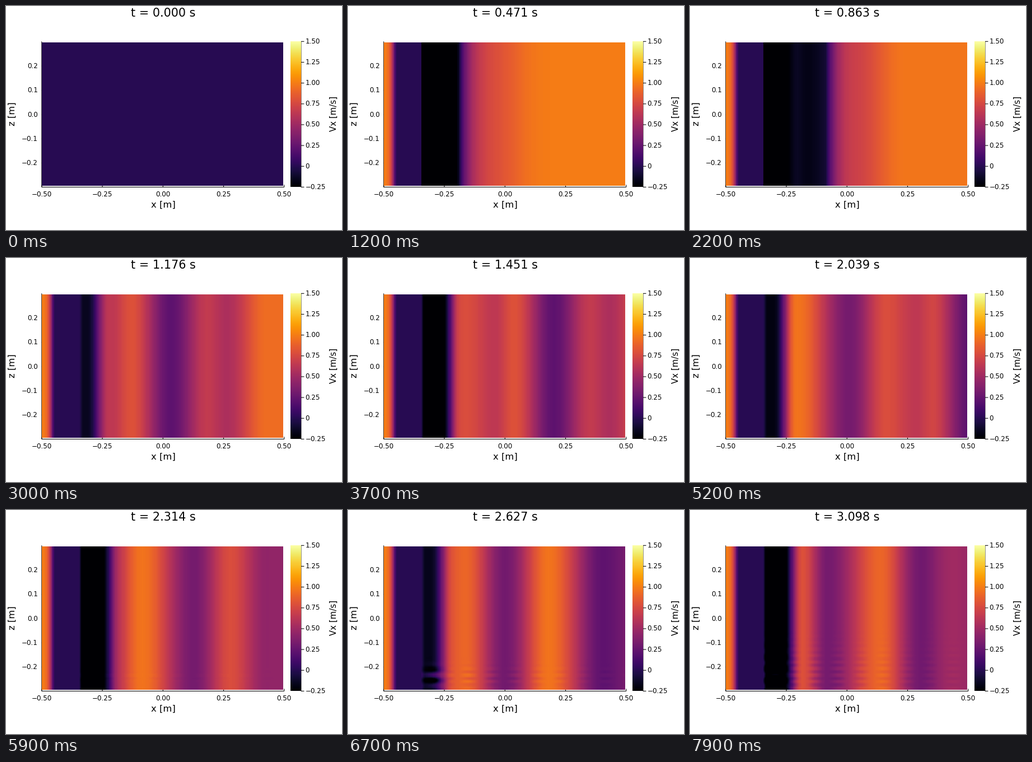
These frames come from a looping animation (600 by 400 pixels, 8 s). A matplotlib script:

```python
import numpy as np
import matplotlib.pyplot as plt
from matplotlib.animation import FuncAnimation

plt.rcParams["font.family"] = "DejaVu Sans"
DPI, W, H = 100, 600, 400
FRAMES, DT = 80, 2 / 51
VMIN, VMAX = -0.25, 1.5
NX, NZ = 200, 120
FRONT, BACK = -0.45, -0.347  # faces of the solid body

x = -0.5 + (np.arange(NX) + 0.5) / NX
z = (0.297 - 0.594 * (np.arange(NZ) + 0.5) / NZ)[:, None]

# crests and troughs of the shed wake, in coordinates that drift with it
CREST_X = [-1.37, -1.265, -1.045, -.88, -.7, -.487, -.333, -.21, -.13,
           .035, .185, .265, .43]
CREST_U = [.8, .32, .9, .31, .96, .32, .78, .64, .8, .22, .66, .56, .93]


def smooth(s):
    s = np.clip(s, 0, 1)
    return s * s * (3 - 2 * s)


def mix(a, b, s):
    return a + (b - a) * s


def bump(s):
    return np.exp(-s * s)


def drift(t):
    """Distance the wake has travelled, with one short slowdown."""
    return 0.617 * (t - 1.176) - 0.087 * bump((t - 2.28) / 0.25)


def wave(q):
    i = np.interp(q, CREST_X, np.arange(len(CREST_X)))
    k = np.minimum(i.astype(int), len(CREST_X) - 2)
    u = np.array(CREST_U)
    return mix(u[k], u[k + 1], smooth(i - k))


def growing_bubble(t):
    """Recirculation behind the body whose end moves off steadily."""
    d = np.maximum(x + 0.35 - 0.306 * t, 0)
    tail = 1 - 0.2 / (1 + np.exp((x - 0.05) / 0.04))
    return mix(-0.5, tail, 1 - np.exp(-d / 0.047))


def shed_wake(t):
    """Short pulsing bubble followed by the drifting wave."""
    pulse = np.cos(2 * np.pi * (t - 2.314) / 0.8)
    core = (-0.29 - 0.16 * pulse) * smooth((x - BACK) / 0.02)
    edge = -0.292 + 0.02 * pulse
    u = mix(core, wave(x - drift(t)), smooth((x - edge) / 0.09))
    drag = 0.5 * smooth((x - 0.28) / 0.22) * smooth(t - 1.5)
    return u * (1 - drag)


def streaks(t):
    """Layers near the floor that strengthen and climb."""
    s = max((t - 2.2) / 0.9, 0)
    reach = min(2.2 * s, 1) * bump((z + 0.245) / (0.02 + 0.09 * s * s))
    near = -0.25 * np.cos(2 * np.pi * (z + 0.21) / 0.049)
    far = 0.08 * np.cos(2 * np.pi * (z + 0.263) / 0.027)
    columns = np.cos(np.pi * (x - drift(t) + 1.03) / 0.095) ** 2
    columns = columns * smooth((x + 0.25) / 0.04) * np.exp(-2 * (x + 0.25))
    return reach * (near * bump((x + 0.295) / 0.04) + far * columns)


def velocity(t):
    if t == 0:
        return np.zeros((NZ, NX))
    u = mix(growing_bubble(t), shed_wake(t), smooth((t - 0.7) / 0.35))
    inlet = 1 - np.clip((x + 0.5) / 0.05, 0, 1) ** 2.5
    return np.where(x < BACK, inlet, u + streaks(t))


fig = plt.figure(figsize=(W / DPI, H / DPI), dpi=DPI, facecolor="white")
ax = fig.add_axes([0, 0, 1, 1])
ax.axis("off")


def label(px, py, text, size, **kw):
    kw = {"ha": "center", "va": "center", **kw}
    return ax.text(px, py, text, fontsize=size * 72 / DPI, **kw)


def line(xs, ys):
    ax.plot(xs, ys, color="black", lw=0.75, zorder=1, snap=False,
            solid_capstyle="butt")


def picture(data, extent):
    return ax.imshow(data, cmap="inferno", extent=extent, aspect="auto",
                     interpolation="nearest", zorder=2)


def num(v, digits=2):
    return f"{v:.{digits}f}".replace("-", "−")


image = picture(velocity(0), (64, 495, 321, 65))
image.set_clim(VMIN, VMAX)
picture(np.linspace(1, 0, 256)[:, None], (508, 526.5, 323, 63))
ax.set_xlim(0, W)
ax.set_ylim(H, 0)

LEFT, RIGHT, TOP, BOTTOM, BAR = 63.8, 496.8, 63.3, 323.4, 526.9
TICK, GUIDE = 11.9, 16.35
line([LEFT, LEFT], [TOP, BOTTOM])
line([LEFT, RIGHT], [BOTTOM, BOTTOM])
line([BAR, BAR], [TOP, BOTTOM])

for v in np.linspace(-0.5, 0.5, 5):
    px = mix(LEFT, RIGHT, v + 0.5)
    line([px, px], [BOTTOM - 4, BOTTOM])
    label(px, 336, num(v), TICK)
for v in np.linspace(-0.2, 0.2, 5):
    py = 193.8 - 433 * v
    line([LEFT, LEFT + 4], [py, py])
    label(57, py + 0.5, num(abs(v) if abs(v) < 1e-9 else v, 1), TICK,
          ha="right")
for v in np.linspace(VMIN, VMAX, 8):
    py = mix(BOTTOM, TOP, (v - VMIN) / (VMAX - VMIN))
    line([BAR, BAR + 5.5], [py, py])
    label(534.5, py, num(v) if v else "0", TICK, ha="left")

label(280.5, 355, "x [m]", GUIDE)
label(11.5, 193, "z [m]", GUIDE, rotation=90)
label(585.5, 192.5, "Vx [m/s]", 15, rotation=90)
title = label(280.5, 19, "", 20.8, va="baseline")


def update(n):
    image.set_data(velocity(n * DT))
    title.set_text(f"t = {n * DT:.3f} s")
    return image, title


anim = FuncAnimation(fig, update, frames=FRAMES, interval=100, repeat=True,
                     repeat_delay=0)
plt.show()
```
